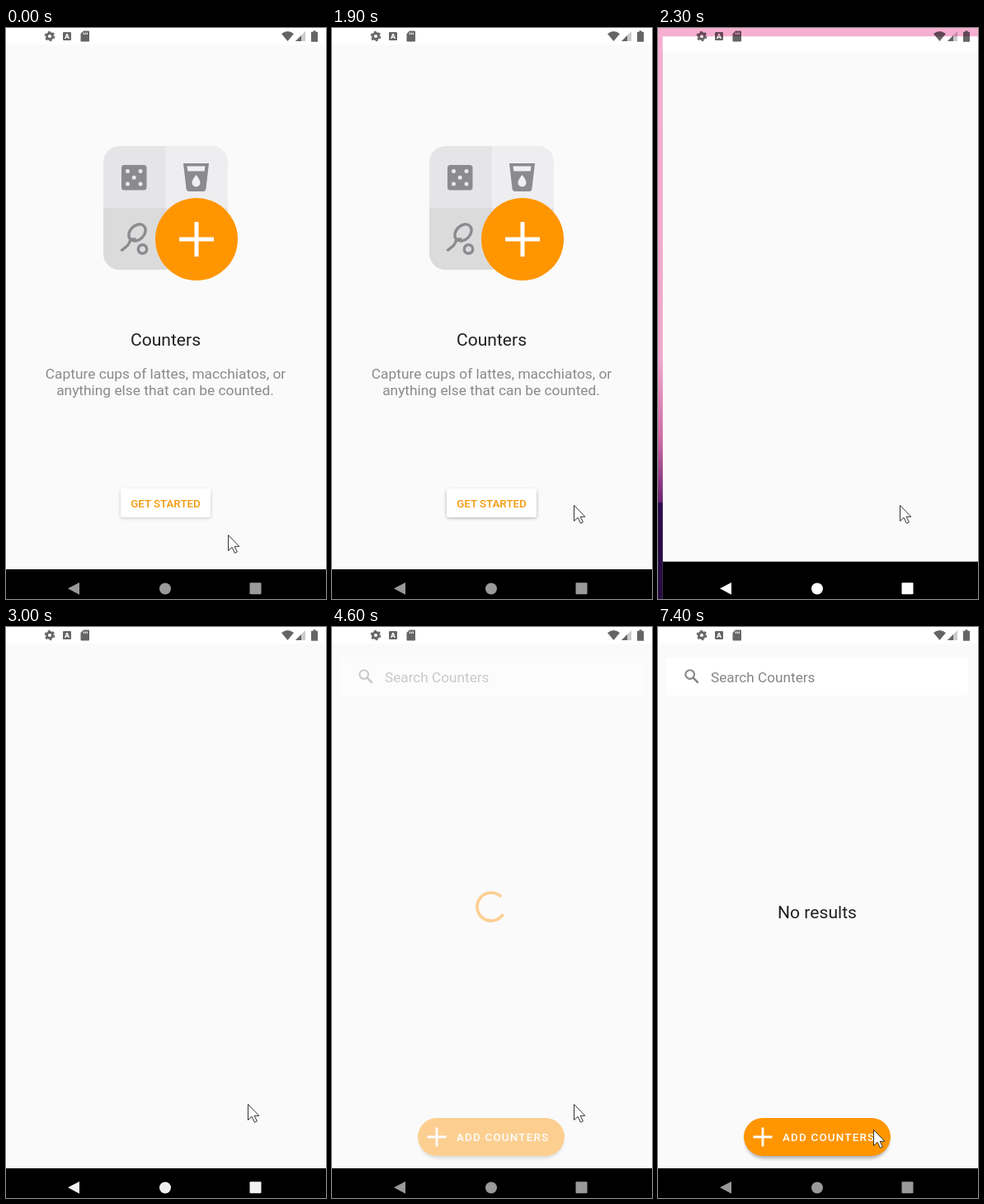
These frames come from a looping animation (388x692 px, 8 s). An HTML page:

```html
<!DOCTYPE html>
<html lang="en">
<head>
<meta charset="utf-8">
<style>
  html, body { margin: 0; width: 100%; height: 100%; overflow: hidden; background: #000; }
  svg { display: block; width: 388px; height: 692px; font-family: Roboto, sans-serif; }
  .title { font-size: 21.1px; fill: #212121; text-anchor: middle; }
  .body { font-size: 17.35px; fill: #8a8a8d; text-anchor: middle; }
  .label { font-size: 13.4px; font-weight: 500; }
</style>
</head>
<body>
<svg viewBox="0 0 388 692">
  <defs>
    <linearGradient id="sky" x2="0" y2="1">
      <stop offset="0" stop-color="#f6afd1"/>
      <stop offset=".58" stop-color="#f3a6cd"/>
      <stop offset=".72" stop-color="#cf6ba4"/>
      <stop offset=".83" stop-color="#6d2273"/>
      <stop offset=".832" stop-color="#2b0d4c"/>
      <stop offset="1" stop-color="#250a3f"/>
    </linearGradient>
    <clipPath id="tile"><rect x="118" y="143" width="151" height="150" rx="20"/></clipPath>
    <filter id="soft" x="-20%" y="-40%" width="140%" height="200%"><feGaussianBlur stdDeviation="2.2"/></filter>
    <g id="window">
      <rect width="388" height="692" fill="#fafafa"/>
      <rect width="388" height="20" fill="#fff"/>
      <rect y="656" width="388" height="36"/>
    </g>
  </defs>

  <rect width="388" height="692" fill="url(#sky)"/>

  <g id="main">
    <rect width="420" height="720" fill="#fafafa"/>
    <rect width="420" height="20" fill="#fff"/>
    <rect y="656" width="420" height="64"/>
    <g id="content">
      <rect x="10" y="37" width="366" height="46" rx="2" fill="#fff"/>
      <g fill="none" stroke="#858585" stroke-width="2.1">
        <circle cx="38.7" cy="57.6" r="5.3"/>
        <path d="M42.5 61.4L48.7 67.6" stroke-width="2.6"/>
      </g>
      <text x="64" y="67" font-size="17.2" fill="#858585">Search Counters</text>
      <rect x="106" y="599" width="174" height="45" rx="22" opacity=".3" filter="url(#soft)"/>
      <rect x="104" y="595" width="178" height="46" rx="23" fill="#ff9500"/>
      <path d="M115.5 618h23M127 606.5v23" stroke="#fff" stroke-width="2.8"/>
      <text class="label" x="151" y="623" fill="#fff" letter-spacing="1.19">ADD COUNTERS</text>
      <path id="spinner" d="M205 327A17 17 0 1 0 207.4 348" fill="none" stroke="#ff9500" stroke-width="3.7"/>
    </g>
    <text id="results" class="title" x="193" y="353">No results</text>
  </g>

  <g id="welcome">
    <use href="#window"/>
    <g clip-path="url(#tile)">
      <rect x="118" y="143" width="151" height="150" fill="#e5e5e7"/>
      <rect x="193.5" y="143" width="76" height="75" fill="#eeeef1"/>
      <rect x="118" y="218" width="76" height="75" fill="#dbdbdc"/>
    </g>
    <rect x="140" y="166" width="30.5" height="30.5" rx="3.5" fill="#8b8b8f"/>
    <g fill="#e8e8ea">
      <circle cx="147.5" cy="173.5" r="2.5"/><circle cx="163" cy="173.5" r="2.5"/>
      <circle cx="155.2" cy="181.2" r="2.5"/>
      <circle cx="147.5" cy="189" r="2.5"/><circle cx="163" cy="189" r="2.5"/>
    </g>
    <path d="M215 164h31l-3.6 31q-.4 3-3.4 3h-17q-3 0-3.4-3z" fill="#8b8b8f"/>
    <path d="M219.5 167.5h22l-.8 6h-20.4zM230.5 178q5 6 5 9.500a5 5 0 0 1-10 0q0-3.500 5-9.500z" fill="#f0f0f3"/>
    <g fill="none" stroke="#8b8b8f" stroke-width="3.400">
      <ellipse cx="159" cy="248" rx="11.500" ry="8.500" transform="rotate(-45 159 248)"/>
      <path d="M151 256q-1 5-4 8l-7.500 6"/>
      <path d="M151 256h6.500"/>
      <circle cx="165.500" cy="268" r="5.200"/>
    </g>
    <circle cx="231" cy="256" r="50" fill="#ff9500"/>
    <path d="M210 256h42M231 235v42" stroke="#fff" stroke-width="5"/>
    <text class="title" x="193.500" y="385">Counters</text>
    <text class="body" x="193.500" y="424.500">Capture cups of lattes, macchiatos, or</text>
    <text class="body" x="193" y="444.500">anything else that can be counted.</text>
    <rect id="shadow" x="139" y="560" width="109" height="34" rx="2" filter="url(#soft)"/>
    <rect id="button" x="139" y="558" width="109" height="35" rx="2"/>
    <text class="label" x="193.500" y="581" fill="#f59a0c" text-anchor="middle">GET STARTED</text>
  </g>

  <g opacity=".6">
    <circle cx="53" cy="10" r="3.500" fill="none" stroke="#000" stroke-width="2.800"/>
    <circle cx="53" cy="10" r="5.500" fill="none" stroke="#000" stroke-width="1.700" stroke-dasharray="2.880"/>
    <path fill-rule="evenodd" d="M70 5h8q1 0 1 1v8q0 1-1 1h-8q-1 0-1-1V6q0-1 1-1zM73.200 7L71 13h1.400l.4-1.300h2.400l.4 1.300H77L74.800 7zm.8 1.600l.7 2h-1.400z"/>
    <path fill-rule="evenodd" d="M94 3.500h6q1 0 1 1v11q0 1-1 1h-8.500q-1 0-1-1V7zM93.800 5.500v2.500h1V5.500zm2 0v2.500h1V5.500zm2 0v2.500h1V5.500z"/>
    <path d="M334 7q7.500-6 15 0l-7.500 9z"/>
    <path d="M363 4v12h-12z" opacity=".35"/>
    <path d="M358 9v7h-7z"/>
    <path d="M372.500 3.300h3v1.500h2.500v12h-8v-12h2.500z"/>
  </g>
  <g id="nav">
    <path d="M75 679.300L89 672v14.800z"/>
    <circle cx="193" cy="679.500" r="7"/>
    <rect x="295.500" y="672.300" width="14" height="14" rx="1"/>
  </g>
  <path id="cursor" d="M.5.500v19l4.600-4.200 3.300 7 3-1.400-3.300-6.600h5.700z" fill="#fff" stroke="#333"/>
</svg>
<script>
const LOOP = 8000, STEP = 100;
const $ = id => document.getElementById(id);

// Linear interpolation over [time, value] keys.
function track(t, keys) {
  let i = keys.findIndex(k => k[0] > t);
  if (i === 0) return keys[0][1];
  if (i < 0) return keys[keys.length - 1][1];
  const [t0, a] = keys[i - 1], [t1, b] = keys[i];
  return a + (b - a) * (t - t0) / (t1 - t0);
}

const pointer = [
  [0, 269, 614], [100, 269, 614], [800, 222, 572], [1500, 222, 572], [1900, 293, 578],
  [5300, 293, 578], [6000, 319, 575], [6200, 327, 582], [6300, 326, 584],
  [6900, 264, 608], [7000, 264, 608], [7200, 257, 609], [7400, 261, 609]
];
const axis = i => pointer.map(p => [p[0], p[i]]);
const pointerX = axis(1), pointerY = axis(2);

function place(id, x, scale) {
  $(id).setAttribute('transform', `translate(${194 + x} 346) scale(${scale}) translate(-194 -346)`);
}

function draw(t) {
  const scale = track(t, [[2000, 1], [2100, .97], [2200, .95], [2300, .97], [2500, 1]]);
  const slide = track(t, [[2000, 0], [2100, 10], [2200, 203], [2300, 398]]);
  place('welcome', -slide, scale);
  place('main', 398 - slide, scale);
  $('welcome').setAttribute('visibility', t < 2300 ? 'visible' : 'hidden');

  $('button').setAttribute('fill', t >= 1000 && t < 1200 ? '#fff1dc' : '#fff');
  $('shadow').setAttribute('opacity', t < 1000 ? .2 : .3);

  $('content').setAttribute('opacity', track(t, [[4500, 0], [4600, .42], [4900, 1]]));
  $('results').setAttribute('opacity', track(t, [[4700, 0], [4900, 1]]));
  $('spinner').setAttribute('visibility', t < 4800 ? 'inherit' : 'hidden');
  $('spinner').setAttribute('transform', `rotate(${(t - 4600) * .5} 193 339)`);

  const grey = track(t, [[2000, 154], [2200, 255], [2900, 255], [3600, 154]]);
  $('nav').setAttribute('fill', `rgb(${grey},${grey},${grey})`);
  $('cursor').setAttribute('transform', `translate(${track(t, pointerX)} ${track(t, pointerY)})`);
}

function tick() {
  draw(Math.floor(performance.now() % LOOP / STEP) * STEP);
  requestAnimationFrame(tick);
}
tick();
</script>
</body>
</html>
```
